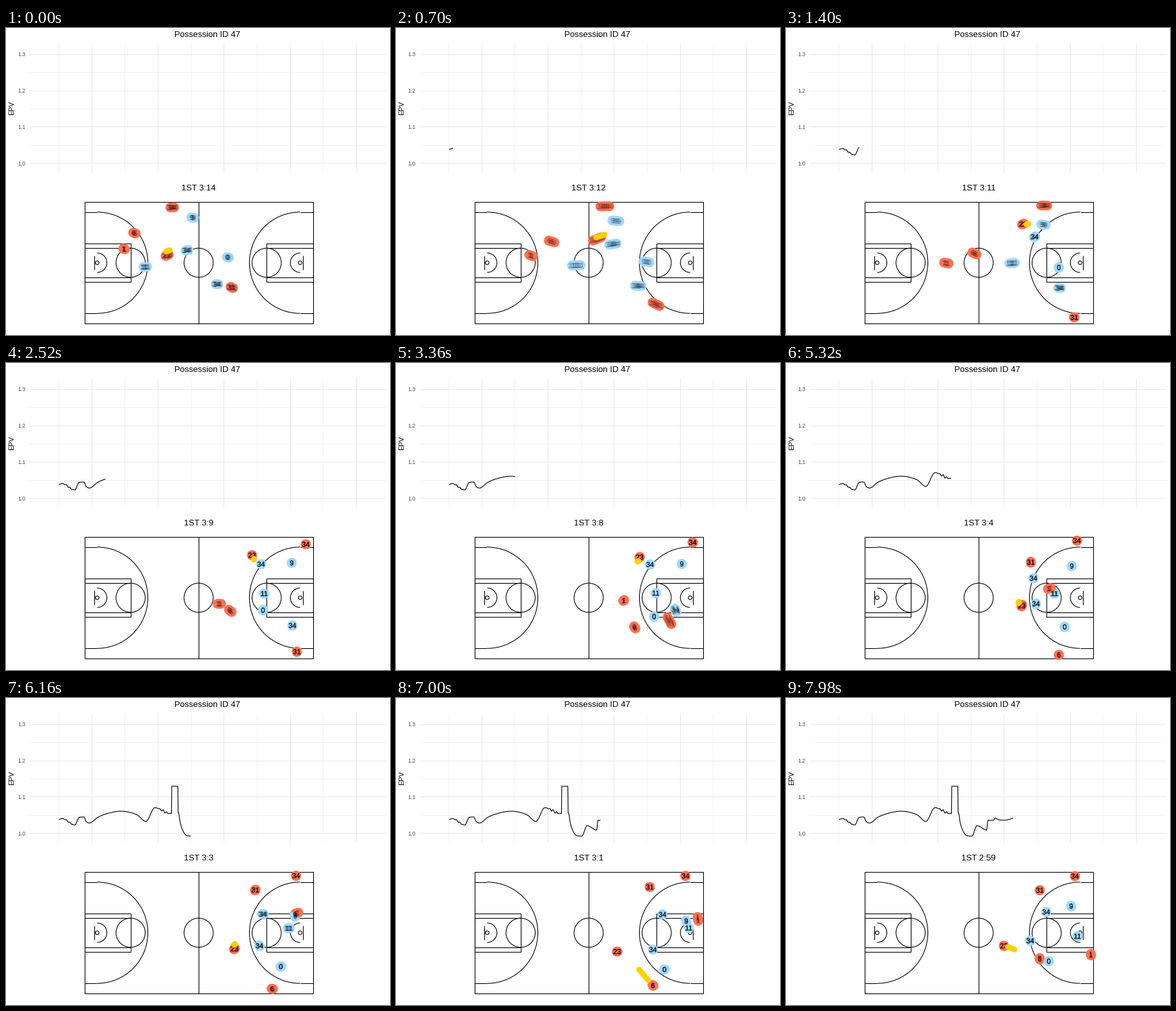
A matplotlib script for the animation above (8000 ms loop, 600 by 480 pixels).

```python
import numpy as np
import matplotlib.pyplot as plt
from matplotlib.animation import FuncAnimation
from matplotlib.collections import LineCollection, PathCollection
from matplotlib.patches import Arc, Circle, Rectangle
from matplotlib.path import Path
from matplotlib.textpath import TextPath
from matplotlib.transforms import Affine2D, IdentityTransform

W, H, DPI = 600, 480, 100
TICK, HOLD, TOTAL = 20, 7, 400      # ms per tick, ticks per step, ticks per loop
PT = 72 / DPI                       # points per pixel
FONT = "Liberation Sans"
RED, BLUE, GOLD = "#FF7052", "#9FD8FF", "#FFD000"
TRAIL = (np.arange(6) - 2.5) / 6    # samples shown together in one step

fig = plt.figure(figsize=(W / DPI, H / DPI), dpi=DPI, facecolor="white")
ax = fig.add_axes([0, 0, 1, 1])
ax.set_xlim(0.5, W + 0.5)
ax.set_ylim(H + 0.5, 0.5)
ax.axis("off")


def label(x, y, s, size, **kw):
    kw = {"ha": "center", "va": "center_baseline", "color": "black", **kw}
    return ax.text(x, y, s, fontsize=size * PT, family=FONT, **kw)


def lines(segs, color, width, z=1):
    ax.add_collection(LineCollection(segs, colors=color, linewidths=width * PT, zorder=z),
                      autolim=False)


def track(*keys):
    """Smooth path through (t, values...) keys that never overshoots a key."""
    keys = np.array(keys, float)
    t, p = keys[:, 0], keys[:, 1:]
    d = np.diff(p, axis=0) / np.diff(t)[:, None]
    a, b = d[:-1], d[1:]
    size = np.minimum(abs(a + b) / 2, 2 * np.minimum(abs(a), abs(b)))
    m = np.vstack([d[:1] / 2, np.where(a * b > 0, np.sign(a) * size, 0), d[-1:] / 2])

    def at(q):
        n = np.clip(np.searchsorted(t, q, "right") - 1, 0, len(t) - 2)
        h = (t[n + 1] - t[n])[:, None]
        u = (q - t[n])[:, None] / h
        return ((1 + 2 * u) * (1 - u) ** 2 * p[n] + u * (1 - u) ** 2 * h * m[n]
                + u * u * (3 - 2 * u) * p[n + 1] + u * u * (u - 1) * h * m[n + 1])
    return at


# --- chart -----------------------------------------------------------------
def grid(xs, ys, width):
    segs = [[(x, 24), (x, 226)] for x in xs] + [[(36, y), (594, y)] for y in ys]
    lines(segs, "#EBEBEB", width)


grid(82.3 + 103.4 * np.arange(5), 69.5 + 56.8 * np.arange(3), 0.6)
grid(134 + 103.4 * np.arange(5), 41.2 + 56.8 * np.arange(4), 1.2)
for n in range(4):
    label(31, 41.5 + 56.8 * n, f"{1.3 - n / 10:.1f}", 8.8, ha="right", color="#4D4D4D")
label(315, 10.5, "Possession ID 47", 13.2)
label(10, 125.5, "EPV", 11, rotation=90, va="center")
clock = label(301.5, 250.5, "", 13.2)

# slow trend, two patches of ripple, and a short plateau
trend = track((83, 190.5), (88, 189), (108, 199), (115, 187), (122, 186.5), (126, 194),
              (131, 196), (144, 187), (156, 182), (180, 177.5), (205, 183), (219, 193.5),
              (233, 172), (257, 181), (270, 180), (273, 197), (284, 216), (291, 216.5),
              (299, 200), (314, 207), (316, 191.7), (325, 191.7), (327, 188), (333, 191),
              (343, 191.5), (356, 188.5))
epv_x = np.arange(83.5, 356, 0.5)
ripple = np.exp(-((epv_x - 97) / 7) ** 2) + 2 * np.exp(-((epv_x - 247) / 7) ** 2)
epv_y = trend(epv_x)[:, 0] + ripple * np.cos(2 * np.pi * (epv_x - 238) / 5.4)
epv_y[(epv_x > 259) & (epv_x < 269.5)] = 138.5
epv, = ax.plot([], [], color="black", lw=1.15 * PT, solid_joinstyle="round",
               solid_capstyle="butt", zorder=2)

# --- court -----------------------------------------------------------------
FT = 3.8
L, R, TOP, BOT = 123, 480, 272.5, 462.5
MID = (TOP + BOT) / 2
INK = {"fill": False, "ec": "black", "lw": 1.1 * PT, "zorder": 2}

ax.add_patch(Rectangle((L, TOP), R - L, BOT - TOP, **INK))
ax.add_patch(Circle((301.5, MID), 6 * FT, **INK))
segs = [[(301.5, TOP), (301.5, BOT)]]
for base, d in ((L, 1), (R, -1)):
    hoop, foul = base + d * 5.25 * FT, base + d * 19 * FT
    board = base + d * 4 * FT
    ax.add_patch(Rectangle((min(base, foul), MID - 8 * FT), 19 * FT, 16 * FT, **INK))
    ax.add_patch(Circle((foul, MID), 6 * FT, **INK))
    ax.add_patch(Circle((hoop, MID), 0.75 * FT, **INK))
    turn = -90 if d > 0 else 90
    for r in (79.2, 4 * FT):
        ax.add_patch(Arc((hoop, MID), 2 * r, 2 * r, theta1=turn, theta2=turn + 180,
                         ec="black", lw=1.1 * PT, zorder=2))
    for s in (-1, 1):
        segs.append([(base, MID + s * 6 * FT), (foul, MID + s * 6 * FT)])
        segs.append([(base, MID + s * 79.2), (hoop, MID + s * 79.2)])
    segs.append([(board, MID - 3 * FT), (board, MID + 3 * FT)])
lines(segs, "black", 1.1, 2)

# --- players and ball ------------------------------------------------------
players = []


def player(number, color, *keys):
    path = track(*keys)
    players.append((number, color, path))
    return path


player("34", BLUE, (0, 330, 401), (10, 428, 407), (18, 448, 411), (30, 418, 363),
       (38, 391, 377), (50, 402, 394), (57, 382, 380))
player("34", BLUE, (0, 283, 348), (10, 389, 327), (18, 399, 315), (30, 394, 317),
       (38, 387, 337), (50, 417, 339), (57, 407, 335))
player("9", BLUE, (0, 292, 297), (10, 403, 308), (18, 447, 313), (38, 447, 318),
       (48, 455, 352), (57, 446, 326))
player("0", BLUE, (0, 347, 359), (10, 427, 375), (18, 402, 387), (30, 409, 406),
       (38, 436, 413), (50, 420, 425), (57, 411, 412))
player("11", BLUE, (0, 218, 374), (10, 354, 368), (18, 404, 361), (30, 409, 360),
       (38, 420, 361), (50, 458, 360), (57, 456, 373))
player("34", RED, (0, 260, 281), (10, 404, 278), (18, 469, 284), (30, 458, 278),
       (57, 452, 279))
player("31", RED, (0, 353, 406), (10, 451, 453), (18, 455, 452), (30, 393, 337),
       (38, 383, 312), (50, 397, 296), (57, 397, 301))
passer = player("23", RED, (0, 252, 356), (10, 371, 307), (18, 385, 301), (30, 375, 313),
                (38, 369, 380), (50, 346, 397), (57, 341, 388))
wing = player("6", RED, (0, 201, 321), (10, 295, 353), (18, 351, 388), (30, 392, 437),
              (38, 427, 457), (50, 402, 450), (57, 397, 408))
player("1", RED, (0, 185, 346), (10, 251, 368), (18, 334, 377), (30, 372, 363),
       (38, 412, 353), (47, 468, 333), (57, 477, 402))


def ball_at(q):
    """Dribbled around the passer, thrown to the wing and back."""
    w = (np.clip((q - 48) / 2.8, 0, 1) - np.clip((q - 54) / 3.2, 0, 1))[:, None]
    angle = np.radians(8 * q - 80)
    dribble = 7 * np.column_stack([np.cos(angle), np.sin(angle)])
    return (1 - w) * (passer(q) + dribble) + w * wing(q)


def glyphs(s):
    path = TextPath((0, 0), s, size=11, prop={"family": FONT})
    x0, y0, x1, y1 = path.get_extents().extents
    return path.transformed(Affine2D().translate(-(x0 + x1) / 2, -(y0 + y1) / 2))


def stamps(paths, colors, z, alpha=None):
    """Shapes sized in pixels and placed by offset."""
    c = PathCollection(paths, facecolors=colors, edgecolors="none", alpha=alpha, zorder=z,
                       offsets=np.zeros((1, 2)), offset_transform=ax.transData,
                       transform=IdentityTransform())
    ax.add_collection(c, autolim=False)
    return c


discs = stamps([Path.circle((0, 0), 7.6)], [p[1] for p in players], 4)
numbers = stamps([glyphs(p[0]) for p in players], ["black"], 5, 0.36)
ball = stamps([Path.circle((0, 0), 4.5)] * 2, [GOLD], 6)


def update(i):
    step = i // HOLD
    now = step + TRAIL
    spots = np.stack([p[2](now) for p in players], axis=1).reshape(-1, 2)
    discs.set_offsets(spots)
    numbers.set_offsets(spots)
    ball.set_offsets(ball_at(now))

    seen = epv_x <= 64 + 5.12 * step
    epv.set_data(epv_x[seen], epv_y[seen])

    left = int(194.1 - 0.25 * step)
    clock.set_text(f"1ST {left // 60}:{left % 60}")
    return discs, numbers, ball, epv, clock


anim = FuncAnimation(fig, update, frames=TOTAL, interval=TICK, repeat=True, repeat_delay=0,
                     init_func=lambda: update(0))
plt.show()
```
